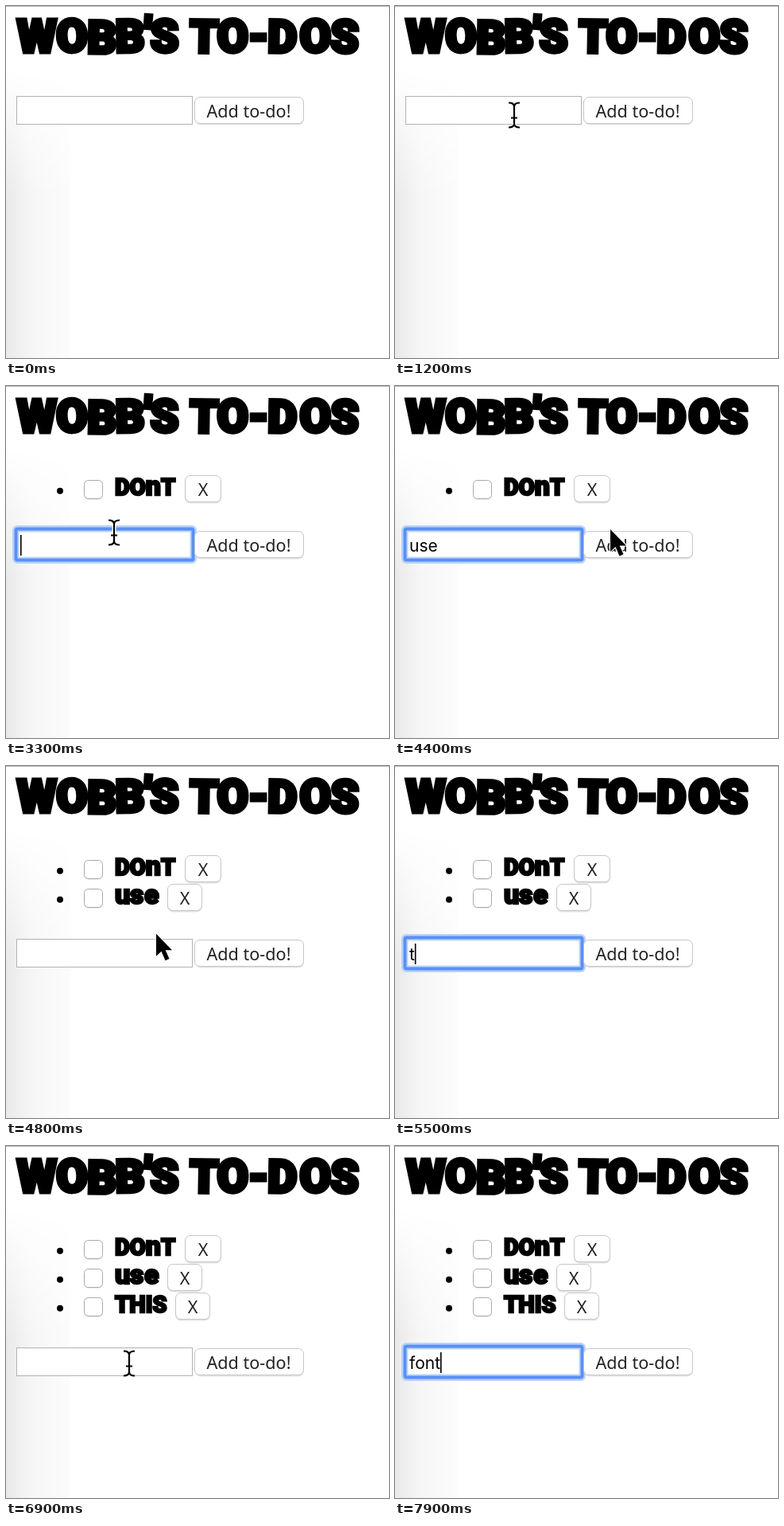
These frames come from a looping animation (482 by 442 pixels, 8000 ms). An HTML page:

```html
<!DOCTYPE html>
<html lang="en">
<head>
<meta charset="utf-8">
<title>To-do list</title>
<style>
  html, body { margin: 0; width: 100%; height: 100%; overflow: hidden; background: #fff; }
  svg { position: absolute; left: 0; top: 0; display: block; }
  .shade {
    position: absolute; left: 0; top: 0; width: 80px; height: 442px;
    background: linear-gradient(to right, rgba(0,0,0,.085), rgba(0,0,0,.035) 40%, rgba(0,0,0,.01));
    -webkit-mask-image: linear-gradient(transparent 80px, #000 240px);
    mask-image: linear-gradient(transparent 80px, #000 240px);
  }
  .fat { font-family: Roboto, sans-serif; font-weight: 900; stroke: #000; }
  .title { font-size: 57px; stroke-width: 5; }
  .item { font-size: 29px; stroke-width: 2.4; }
  .low { font-size: 34px; }
  .ui { font: 21.6px "Noto Sans", sans-serif; fill: #222; }
  .typed { font: 21px Inter, sans-serif; }
  .btn { fill: #fff; stroke: #c6c6c6; }
</style>
</head>
<body>
<div class="shade"></div>
<svg width="482" height="442" viewBox="0 0 482 442">
  <rect width="482" height="1" fill="#b4b4b4"/>
  <text class="fat title" y="58 58 59 58 54 58 58 58 58 57 58 58 58"
    x="14 64 102 138 172 182 218 231 266 305 329 370 408"
    rotate="0 -2 1 -1 4 -1 0 1 -1 0 1 -1 1">WOBB'S TO-DOS</text>
  <g id="list"></g>
  <g id="form">
    <g id="ring">
      <rect x="8" y="107" width="232" height="48" rx="6" fill="#b9d2fa"/>
      <rect x="10.5" y="109.5" width="227" height="43" rx="4" fill="#5990f4"/>
      <rect x="14.5" y="113.5" width="219" height="35" fill="#bfd5fb"/>
      <rect x="16.5" y="115.5" width="215" height="31" fill="#fff"/>
    </g>
    <rect id="box" x="13.5" y="113.5" width="221" height="35" fill="#fff" stroke="#b2b2b2"/>
    <text id="typed" class="typed" x="18" y="140"></text>
    <rect id="caret" y="119" width="1.6" height="26"/>
    <rect x="238" y="115.5" width="137" height="34" rx="7" fill="#e2e2e2"/>
    <rect class="btn" x="237.5" y="114.5" width="137" height="33" rx="6.5"/>
    <text class="ui" x="252.5" y="140">Add to-do!</text>
  </g>
  <path id="arrow" d="M0 0V28L6.5 22L11.5 33.5L16.5 31.3L11.7 20.5H20Z"
    stroke="#fff" stroke-width="2.2" paint-order="stroke"/>
  <g id="beam" fill="none">
    <path id="beamPath" d="M-7-15.5Q0-15.5 0-10.5Q0-15.5 7-15.5M0-10.5V10.5M-7 15.5Q0 15.5 0 10.5Q0 15.5 7 15.5M-4 3.5H4"
      stroke="#fff" stroke-width="4.5"/>
    <use href="#beamPath"/>
    <path id="beamInk" stroke="#000" stroke-width="2.2"/>
  </g>
</svg>
<script>
const LOOP = 8000, STEP = 100, ROW = 36;
const $ = id => document.getElementById(id);

const items = [
  { label: 'DO<tspan class="low">n</tspan>T', x: 225, w: 46 },
  { label: '<tspan class="low" x="137 156 174">use</tspan>', x: 203, w: 44 },
  { label: 'THIS', x: 213, w: 44 }
];

const entries = [
  { word: 'dont', focus: 1300, type: 1700, add: 2600 },
  { word: 'use', focus: 3200, type: 3700, add: 4600 },
  { word: 'this', focus: 5000, type: 5500, add: 6400 },
  { word: 'font', focus: 7100, type: 7500, add: Infinity }
];

// Pointer keys: time, x, y; a bare time hides it.
const path = [
  [0], [700, 360, 247], [1200, 150, 137], [1700],
  [2200, 180, 137], [2400, 306, 122], [2600, 310, 125], [2700, 310, 125], [3200, 136, 184], [3700],
  [4100, 165, 186], [4400, 271, 180], [4600, 267, 186], [4900, 150, 223], [5000, 148, 222], [5500],
  [6000, 170, 228], [6300, 262, 242], [6600, 265, 243], [6900, 155, 273], [7500]
];

$('beamInk').setAttribute('d', $('beamPath').getAttribute('d'));

$('list').innerHTML = items.map(({ label, x, w }, i) => `
  <g transform="translate(0 ${i * ROW})">
    <circle cx="68" cy="131.8" r="4"/>
    <rect x="98.5" y="119.5" width="23" height="23" rx="5" fill="#d8d8d8"/>
    <rect x="98.5" y="118.5" width="23" height="23" rx="5" fill="#fff" stroke="#a9a9a9"/>
    <text class="fat item" x="137" y="137">${label}</text>
    <rect x="${x}" y="113.5" width="${w}" height="34" rx="7" fill="#e2e2e2"/>
    <rect class="btn" x="${x + .5}" y="112.5" width="${w - 1}" height="33" rx="6.5"/>
    <text class="ui" x="${x + w / 2}" y="138" text-anchor="middle">X</text>
  </g>`).join('');
const rows = [...$('list').children];

const show = (el, on) => { el.style.display = on ? '' : 'none'; };
const place = (el, x, y) => el.setAttribute('transform', `translate(${x} ${y})`);

function pointerAt(t) {
  const i = path.findLastIndex(k => k[0] <= t);
  const a = path[i], b = path[i + 1];
  if (a.length < 2) return null;
  if (!b || b.length < 2) return [a[1], a[2]];
  const p = (t - a[0]) / (b[0] - a[0]);
  return [a[1] + (b[1] - a[1]) * p, a[2] + (b[2] - a[2]) * p];
}

function draw(t) {
  const count = entries.filter(e => e.add <= t).length;
  const { word, focus, type } = entries[count];
  const focused = t >= focus;
  const typed = Math.max(0, Math.min(word.length, Math.floor((t - type) / STEP) + 1));
  const lastKey = typed ? type + (typed - 1) * STEP : focus;
  const top = count ? 32 + count * ROW : 0;

  rows.forEach((row, i) => show(row, i < count));
  place($('form'), 0, top);
  show($('ring'), focused);
  show($('box'), !focused);
  $('typed').textContent = word.slice(0, typed);
  show($('caret'), focused && (t - lastKey) % 1000 < 500);
  $('caret').setAttribute('x', 18 + (typed ? $('typed').getComputedTextLength() : 0));

  const at = pointerAt(t);
  const inBox = at && at[0] > 13 && at[0] < 235 && at[1] > 113 + top && at[1] < 149 + top;
  show($('arrow'), at && !inBox);
  show($('beam'), inBox);
  if (at) place(inBox ? $('beam') : $('arrow'), ...at);
}

function tick() {
  const t = performance.now() % LOOP;
  draw(Math.floor(t / STEP) * STEP);
  requestAnimationFrame(tick);
}
tick();
</script>
</body>
</html>
```
